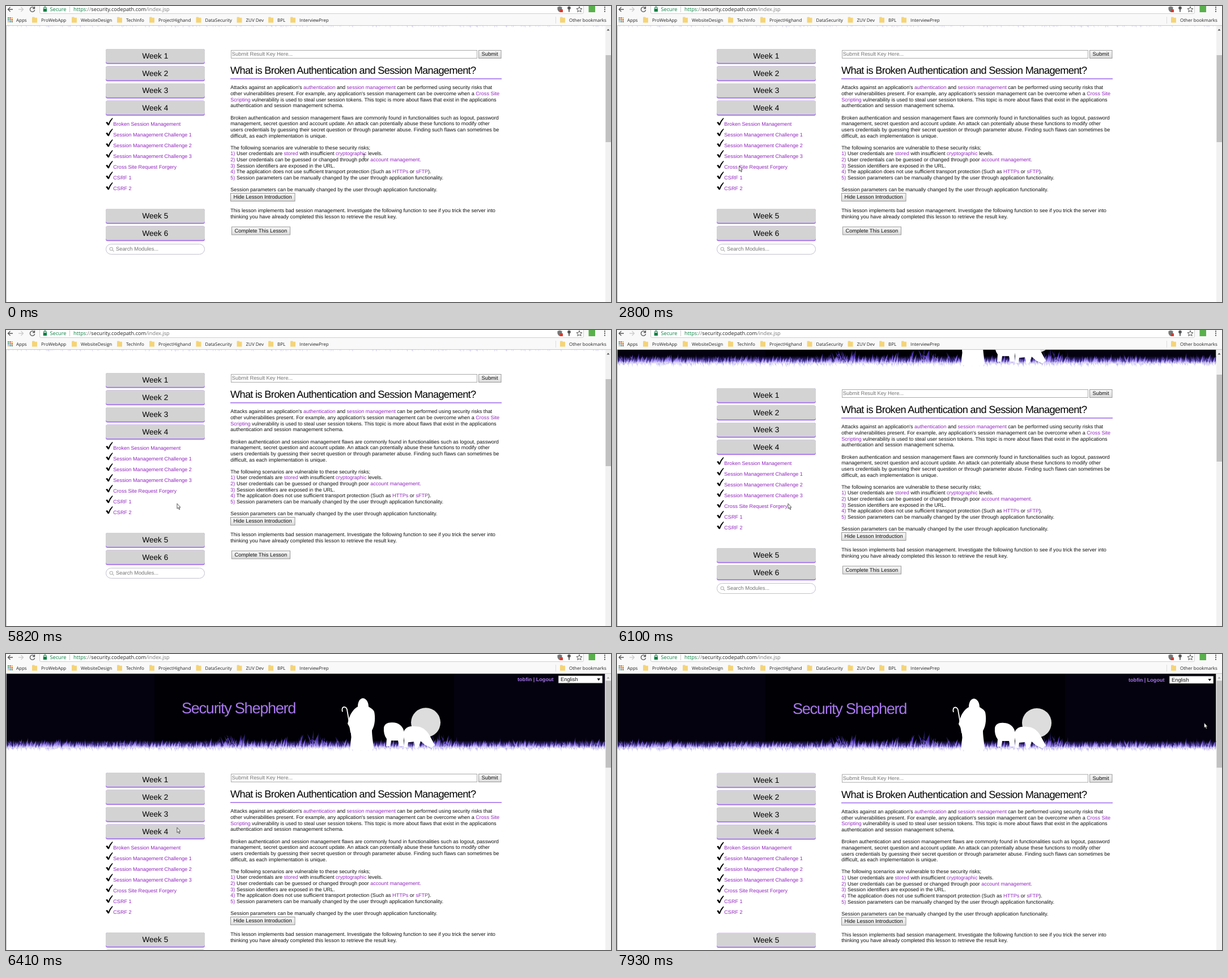
An HTML page for the animation above (8000 ms loop, 1068 px wide and 524 px high).

```html
<!DOCTYPE html>
<html lang="en">
<head>
<meta charset="utf-8">
<title>Lesson page</title>
<style>
html, body { margin: 0; width: 100%; height: 100%; overflow: hidden; background: #fff; }
svg { display: block; }
text { font: 9.07px "Liberation Sans", Arial, sans-serif; fill: #111; text-rendering: geometricPrecision; }
.link { fill: #9126bd; }
.link.hover { fill: #a878ef; }
.control { font-size: 9.33px; }
.hint { font-size: 9.33px; fill: #757575; }
.week { font-size: 13.6px; text-anchor: middle; fill: #000; }
.title { font-size: 18.14px; letter-spacing: -.643px; fill: #000; }
.brand { font-size: 27.2px; letter-spacing: -1.33px; fill: #a878ef; }
.user { font-weight: bold; fill: #a878ef; text-anchor: end; }
.ui { font: 8px "Open Sans", "Noto Sans", sans-serif; fill: #222; }
.url { font-size: 9.2px; fill: #777; }
.safe { fill: #0b8043; }
.host { fill: #222; }
</style>
</head>
<body>
<svg width="1068" height="524" viewBox="0 0 1068 524">
  <defs>
    <linearGradient id="face" x2="0" y2="1">
      <stop stop-color="#f8f8f8"/><stop offset="1" stop-color="#dcdcdc"/>
    </linearGradient>
    <linearGradient id="soil" gradientUnits="userSpaceOnUse" x1="0" y1="154" x2="0" y2="169">
      <stop stop-color="#05020f"/><stop offset=".6" stop-color="#3d2b94"/><stop offset="1" stop-color="#fff"/>
    </linearGradient>
    <linearGradient id="blade" gradientUnits="userSpaceOnUse" x1="0" y1="138" x2="0" y2="168">
      <stop stop-color="#2a1c66"/><stop offset=".5" stop-color="#4f35b4"/>
      <stop offset=".78" stop-color="#a48ff2"/><stop offset="1" stop-color="#fff"/>
    </linearGradient>
  </defs>

  <g id="page">
    <g transform="translate(0 -134.67)">
      <path d="M1 35H1057.3V156H1Z" fill="#05020f"/>
      <path d="M262 35H791V156H262Z" fill="#000005"/>
      <path d="M1 154H1057.3V172H1Z" fill="url(#soil)"/>
      <path id="grass" fill="url(#blade)"/>
      <path id="fringe" fill="#7560d8" opacity=".45"/>
      <circle cx="741" cy="122" r="26" fill="#ddd"/>
      <g fill="#fff">
        <path d="M629.500 79C623 80 621 88 621 94C613 98 607 108 605 117L603 124L608 133L609.500 148L607 169Q628 174 649 169C648 155 646 145 646 136C652 126 652 112 650 103C648 98 643 96 640 94C640 86 636 79 629.500 79Z"/>
        <path d="M667 131C668 124 675 121 683 122C692 122 700 128 702 136V164H694L692 154H680L678 164H671L672 151Q666 143 667 131Z"/>
        <path d="M701 142C703 131 712 127 724 129C738 129 746 140 751 151L757 162L751 167L740 162L732 155L728 167H722L720 156L710 157L709 166H702L703 154Z"/>
        <path d="M594 103C591 93 600 92 602 99L609 140" fill="none" stroke="#fff" stroke-width="1.8"/>
      </g>
      <text class="brand" x="310" y="105.5">Security Shepherd</text>
      <text class="user" x="966.5" y="49">tobfin | Logout</text>
      <path d="M975.3 39.3H1052.7V52H975.3Z" fill="#fff" stroke="#aaa" stroke-width=".6"/>
      <text class="control" x="979" y="49">English</text>
      <path d="M1043.5 44H1049L1046.2 48Z"/>
    </g>
    <g id="content"></g>
  </g>

  <path d="M.5 35V524" stroke="#bbb"/>
  <path d="M1058 35H1068V524H1058Z" fill="#f1f1f1"/>
  <path id="up" d="M1060.5 43.5L1063 40.5L1065.5 43.5Z"/>
  <path id="thumb" d="M1058.5 0H1068V154H1058.5Z" fill="#c1c1c1"/>

  <path d="M0 0H1068V35H0Z" fill="#f9f9f9"/>
  <path d="M0 34.6H1068" stroke="#b6b6b6" stroke-width=".8"/>
  <path d="M59.5 0V11Q59.5 13.5 62 13.5H1017Q1019.5 13.5 1019.5 11V0" fill="#fff" stroke="#c4c4c4" stroke-width=".8"/>
  <g fill="none" stroke="#555" stroke-width="1.3">
    <path d="M12 6H3.5M7.5 2L3.5 6L7.5 10"/>
    <path d="M22 6H30.5M26.5 2L30.5 6L26.5 10" stroke="#ccc"/>
    <path d="M50 3.5A4.2 4.2 0 1 0 50.7 7M50.5 1V4.5H47"/>
    <path d="M1012 1L1013.4 4.5L1017 4.7L1014.2 7L1015.2 10.5L1012 8.5L1008.8 10.5L1009.8 7L1007 4.7L1010.6 4.5Z" stroke-width="1"/>
    <path d="M67 5V3.5A1.9 1.9 0 0 1 70.8 3.5V5" stroke="#0b8043"/>
    <path d="M994 5V10.5" stroke-width="1.8"/>
  </g>
  <path d="M65.7 5H72V10H65.7Z" fill="#0b8043"/>
  <path d="M973.5 2L977.5 .8L981.5 2V6Q981 9 977.5 11Q974 9 973.5 6Z" fill="#777"/>
  <path d="M978 6H983V11H978Z" fill="#d8382c"/>
  <circle cx="994" cy="3.5" r="2.8" fill="#555"/>
  <path d="M1028.5 0H1040V11H1028.5Z" fill="#58b04b"/>
  <path d="M1056 1.2h2v2h-2zm0 3.6h2v2h-2zm0 3.6h2v2h-2z" fill="#555"/>
  <text class="ui url safe" x="77.5" y="9.3">Secure</text>
  <path d="M112.5 1V11" stroke="#ccc"/>
  <text class="ui url" x="119" y="9.3"><tspan class="safe">https</tspan>://<tspan class="host">security.codepath.com</tspan>/index.jsp</text>
  <g id="bookmarks"></g>
  <path d="M970.5 19V31" stroke="#ddd"/>

  <g id="cursor">
    <path id="arrow" d="M.5 .3V9.2L2.5 7.4L4 10.8L5.4 10.2L4 7H6.5Z" fill="#fff" stroke="#222" stroke-width=".75"/>
    <path id="beam" d="M.5 .4H2Q2.5 .4 2.5 1Q2.5 .4 3 .4H4.5M2.5 1V8M.5 8.6H2Q2.5 8.6 2.5 8Q2.5 8.6 3 8.6H4.5" fill="none" stroke="#222" stroke-width=".8"/>
  </g>
</svg>

<script>
const $ = id => document.getElementById(id);
const text = (x, y, str, cls = '') => `<text x="${x}" y="${y}" class="${cls}">${
  str.replace(/\[(.*?)\]/g, '<tspan class="link">$1</tspan>')}</text>`;
const box = (x, y, w, h, fill, stroke = 'none', r = 0) =>
  `<rect x="${x}" y="${y}" width="${w}" height="${h}" rx="${r}" fill="${fill}" stroke="${stroke}"/>`;
const button = (x, y, w, label) =>
  box(x + .5, y + .5, w - 1, 14, 'url(#face)', '#999') + text(x + 5.5, y + 10.2, label, 'control');

function drawSidebar() {
  const tops = [76, 106.5, 137, 167.5, 359, 389.5];
  const weeks = tops.map((y, i) =>
    box(176, y, 175, 26.7, '#a878ef', 'none', 3.5) + box(176, y, 175, 24.7, '#d3d3d3', 'none', 3.5) +
    text(263.3, y + 17, `Week ${i + 1}`, 'week'));
  const lessons = ['Broken Session Management', 'Session Management Challenge 1',
    'Session Management Challenge 2', 'Session Management Challenge 3',
    'Cross Site Request Forgery', 'CSRF 1', 'CSRF 2'];
  const links = lessons.map((name, i) => {
    const y = 211.5 + 19 * i;
    return `<path d="M176.3 ${y - 5.3}q2.4 -2 3.5 0l1 2q2.2 -6 6.6 -10l1.4 .6q-5 6 -7 12.5h-1.9z"/>` +
      text(189.3, y, name, 'link lesson');
  });
  const search = box(176.5, 421.5, 174, 18, '#fff', '#c3bfd0', 9) +
    '<g fill="none" stroke="#bbb" stroke-width="1.2"><circle cx="185.8" cy="430" r="2.7"/><path d="M188 432L190.5 434.5"/></g>' +
    text(194, 433.3, 'Search Modules...', 'hint');
  return weeks.join('') + links.join('') + search;
}

function drawLesson() {
  const lines = [
    "Attacks against an application's [authentication] and [session management] can be performed using security risks that",
    "other vulnerabilities present. For example, any application's session management can be overcome when a [Cross Site]",
    '[Scripting] vulnerability is used to steal user session tokens. This topic is more about flaws that exist in the applications',
    'authentication and session management schema.',
    '',
    'Broken authentication and session management flaws are commonly found in functionalities such as logout, password',
    'management, secret question and account update. An attack can potentially abuse these functions to modify other',
    'users credentials by guessing their secret question or through parameter abuse. Finding such flaws can sometimes be',
    'difficult, as each implementation is unique.',
    '',
    'The following scenarios are vulnerable to these security risks;',
    '[1)] User credentials are [stored] with insufficient [cryptographic] levels.',
    '[2)] User credentials can be guessed or changed through poor [account management.]',
    '[3)] Session identifiers are exposed in the URL.',
    '[4)] The application does not use sufficient transport protection (Such as [HTTPs] or [sFTP]).',
    '[5)] Session parameters can be manually changed by the user through application functionality.',
    '',
    'Session parameters can be manually changed by the user through application functionality.'
  ];
  return box(397.5, 78.5, 434, 14, '#fff', '#a9a9a9') +
    text(398.8, 88.2, 'Submit Result Key Here...', 'hint') +
    button(834, 78, 40.5, 'Submit') +
    text(396, 120.3, 'What is Broken Authentication and Session Management?', 'title') +
    box(396, 128, 479, 1.7, '#a878ef') +
    lines.map((line, i) => text(396.3, 147.3 + i * 10.65, line)).join('') +
    button(396, 331, 114.5, 'Hide Lesson Introduction') +
    text(396.3, 365.2, 'This lesson implements bad session management. Investigate the following function to see if you trick the server into') +
    text(396.3, 375.8, 'thinking you have already completed this lesson to retrieve the result key.') +
    button(398, 390.5, 104, 'Complete This Lesson');
}

function drawBookmarks() {
  const folder = x => `<path d="M${x} 20.5q0 -1 1 -1h3l1 1.2h4v8.8h-9z" fill="#f5d477"/>`;
  const items = [['ProWebApp', 62], ['WebsiteDesign', 132], ['TechInfo', 212], ['ProjectHighand', 269],
    ['DataSecurity', 351.5], ['ZUV Dev', 423.5], ['BPL', 479], ['InterviewPrep', 518], ['Other bookmarks', 994]];
  const colours = ['#e04a3a', '#3f9e57', '#4a84e8', '#efb52f'];
  let dots = '';
  for (let i = 0; i < 9; i++)
    dots += box(3 + i % 3 * 3.3, 20 + Math.floor(i / 3) * 3.3, 2.3, 2.3, colours[(i * 3 + 1) % 4]);
  return dots + text(18, 27.5, 'Apps', 'ui') +
    items.map(([name, x]) => folder(x - 16) + text(x, 27.5, name, 'ui')).join('');
}

function drawGrass() {
  let seed = 7;
  const rnd = () => (seed = seed * 16807 % 2147483647) / 2147483647;
  const tall = x => [[405, 30], [545, 55], [765, 25]]
    .reduce((h, [c, w]) => h + 14 * Math.exp(-(((x - c) / w) ** 2)), 0);
  let grass = '', fringe = '';
  for (let x = 2; x < 1055; x += 1.1) {
    // Most blades are short; a few rise well above the rest
    const h = 8 + rnd() * 6 + rnd() ** 3 * (8 + tall(x)), lean = (rnd() - .5) * h * .7;
    const [mid, tip, back, foot] = [-h / 2, lean, 1 - lean / 3, 1.8 - lean].map(v => v.toFixed(1));
    grass += `M${x.toFixed(1)} 170q0 ${mid} ${tip} ${-h.toFixed(1)}q${back} ${-mid} ${foot} ${h.toFixed(1)}z`;
    if (rnd() < .4)
      fringe += `M${x.toFixed(1)} 167h1.4l${((rnd() - .5) * 4).toFixed(1)} ${(1 + rnd() * 6).toFixed(1)}z`;
  }
  $('grass').setAttribute('d', grass);
  $('fringe').setAttribute('d', fringe);
}

$('content').innerHTML = drawSidebar() + drawLesson();
$('bookmarks').innerHTML = drawBookmarks();
drawGrass();

// Each step: start time, then its values
const pointer = [
  [0, 629.5, 262, 'beam'], [120, 690, 265], [250, 744, 266], [390, 747, 266], [1500, 641, 250.5],
  [1620, 508, 223, 'beam'], [1770, 488, 219.5, 'beam'], [2390, 242, 198], [2530, 169, 232], [2660, 172, 254],
  [2800, 215, 283], [2930, 305, 258], [3050, 371, 216], [3200, 315, 201], [3330, 283, 196],
  [3470, 267, 196], [3600, 259, 198], [4050, 259.5, 199], [4200, 267, 201], [4330, 274, 203],
  [4630, 277, 210], [4780, 284, 227], [4930, 289, 235], [5050, 293, 247], [5170, 295, 262],
  [5290, 295, 275], [5430, 295, 284], [5550, 294, 294], [5700, 298, 302], [5820, 301.5, 307],
  [7360, 306, 280.5], [7510, 640, 215], [7640, 1050, 132], [7780, 0, 0, 'none'], [7930, 1036, 121.5]
];
const scroll = [[0, 0], [6100, 27], [6260, 74], [6410, 134], [6550, 134.67]];
const hover = [[0, -1], [4630, 0], [4780, -1], [4930, 1], [5050, 2], [5170, 3], [5290, -1], [5430, 4], [5700, -1]];
const lessons = document.querySelectorAll('.lesson');
const at = (steps, t) => steps.findLast(step => step[0] <= t);
const move = (id, x, y) => $(id).setAttribute('transform', `translate(${x} ${y})`);

function render(now) {
  const t = now % 8000;
  const [, x, y, shape = 'arrow'] = at(pointer, t);
  move('cursor', x, y);
  for (const id of ['arrow', 'beam']) $(id).style.display = id === shape ? '' : 'none';

  const shift = at(scroll, t)[1];
  move('page', 0, shift);
  move('thumb', 0, 87 - shift * .296);
  $('up').style.fill = shift > 133 ? '#a3a3a3' : '#505050';

  const active = at(hover, t)[1];
  lessons.forEach((el, i) => el.classList.toggle('hover', i === active));
}

const start = performance.now();
(function tick() {
  render(performance.now() - start);
  requestAnimationFrame(tick);
})();
</script>
</body>
</html>
```
